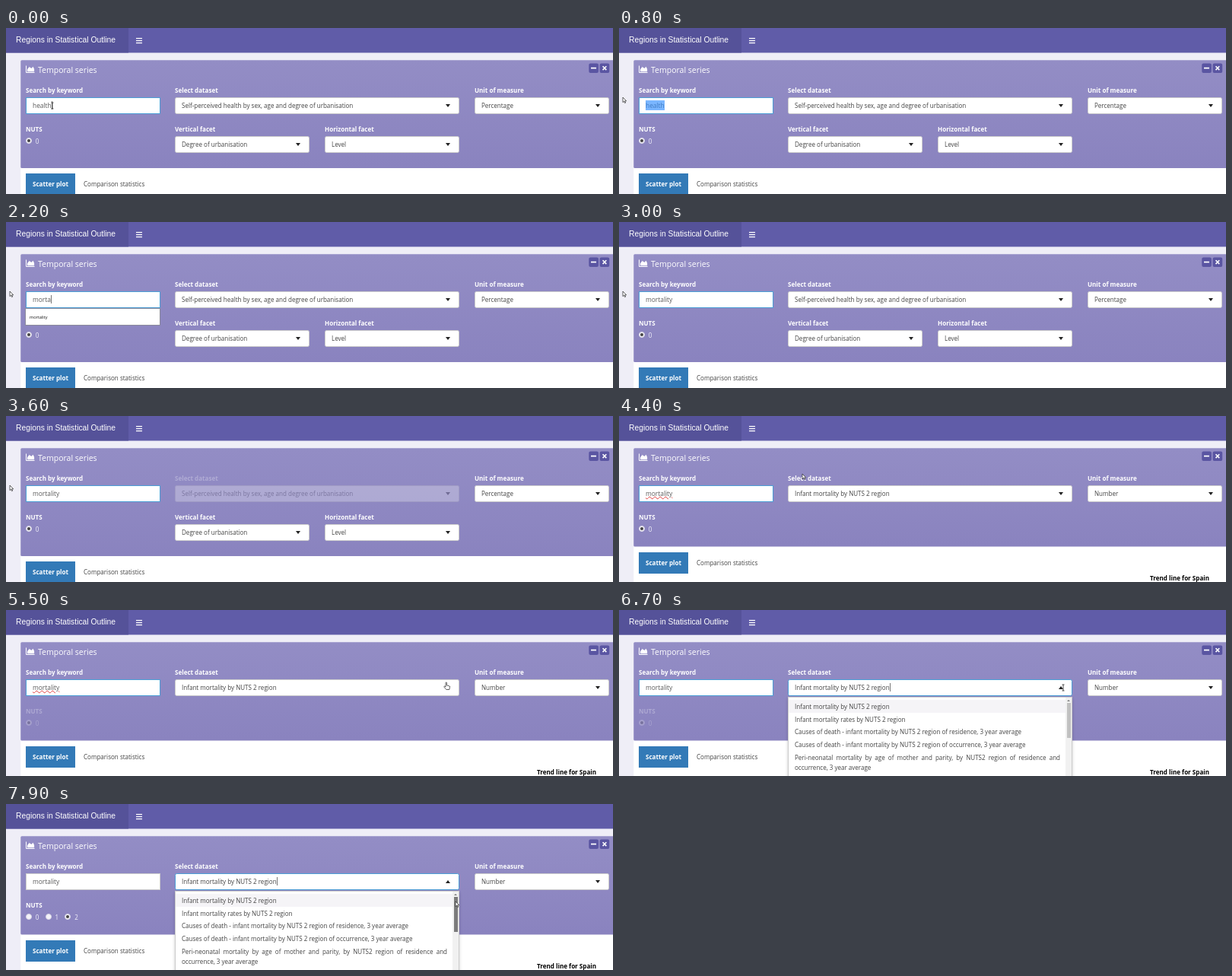
An HTML page for the animation above (8 s loop, 798 by 218 pixels).

```html
<!DOCTYPE html>
<html lang="en">
<head>
<meta charset="utf-8">
<style>
html, body { margin: 0; width: 100%; height: 100%; overflow: hidden; }
body { position: relative; background: #efeef7; font: 8.05px "Open Sans", "Noto Sans", sans-serif; color: #444; }
div, svg { position: absolute; box-sizing: border-box; white-space: nowrap; }
svg { left: 0; top: 0; width: 798px; height: 218px; overflow: visible; }
#brand { left: 13px; top: 0; color: #fff; font: 10.3px/32px "Liberation Sans", Arial, sans-serif; }
#tabs { left: 19.5px; width: 790px; height: 80px; }
#tab { left: 6.5px; top: 7px; width: 65px; height: 28px; background: #337ab7; color: #fff; font-weight: 700; line-height: 28px; text-align: center; }
#other { left: 82.5px; top: 7px; line-height: 28px; }
#trend { left: 678.5px; top: 30px; line-height: 22px; color: #000; font-weight: 700; }
.label { color: #fff; font-weight: 700; line-height: 12px; }
.field { height: 22px; padding-left: 8px; border: 1px solid #ccc; border-radius: 2.5px; background: #fff; line-height: 20px; }
.field.focus { border-color: #4c9fd6; }
#search { border-radius: 0; }
.arrow { right: 11px; top: 8px; border: 3.6px solid transparent; border-top: 4px solid #222; border-bottom: 0; }
.arrow.up { border-top: 0; border-bottom: 4px solid #222; }
.edit { display: inline-block; position: static; line-height: 11px; border-right: .8px solid transparent; }
.edit.caret { border-color: #777; }
#word { font-size: 8.4px; color: #5a5a5a; }
#word.wavy { text-decoration: underline wavy #e04040 .6px; text-underline-offset: 0; }
#mark { top: 95px; height: 13px; background: #3390ff; opacity: .65; }
#hint { left: 25px; top: 113px; width: 178px; height: 23px; padding-left: 5px; border: .7px solid #8a8a9a; background: #fff; color: #111; font-size: 5.6px; line-height: 22px; }
.radio { top: 144px; width: 8px; height: 8px; border: 1px solid #d8d6e4; border-radius: 50%; background: #f4f3fa; }
.radio.on::after { content: ""; position: absolute; left: 1px; top: 1px; width: 4px; height: 4px; border-radius: 50%; background: #444; }
.num { top: 142.5px; line-height: 12px; color: #f3f2fb; }
#list { left: 222px; top: 114px; width: 374px; height: 130px; padding-top: 3px; border: 1px solid #ccc; background: #fff; box-shadow: 0 2px 4px #0003; }
#list p { margin: 0; width: 365px; box-sizing: border-box; padding: 1.85px 8px; line-height: 13px; white-space: normal; text-align: justify; }
#list p:first-child { background: #f5f4f7; }
#rail { right: 0; top: 0; width: 8px; height: 130px; background: #f1f1f1; }
#rail::before { content: ""; position: absolute; left: 2px; top: 3px; border: 2px solid transparent; border-top: 0; border-bottom: 2.5px solid #777; }
#thumb { left: 2px; top: 7px; width: 5px; height: 46px; }
</style>
</head>
<body>
<svg>
  <linearGradient id="shade" x2="0" y2="1"><stop stop-color="#938dc5"/><stop offset="1" stop-color="#8a83bf"/></linearGradient>
  <rect width="798" height="32.5" fill="#605ca8"/>
  <rect width="161" height="32.5" fill="#555299"/>
  <rect x="19.25" y="44" width="790" height="180" fill="#fff"/>
  <rect id="panel" x="19.25" y="42.3" width="790" rx="1.5" fill="url(#shade)"/>
  <path d="M171 13.6h8M171 16.6h8M171 19.6h8" stroke="#fff" stroke-width="1.4"/>
  <path d="M26.5 49.5v9h11" fill="none" stroke="#fff"/>
  <path d="M28 57.3v-3l2.7-3.2 2.6 2 2.3-2.4 1.5 3.2v3.4z" fill="#fff"/>
  <g fill="#5a55a2"><rect x="766.3" y="46.5" width="12.6" height="12.5" rx="2"/><rect x="780.6" y="46.5" width="12.6" height="12.5" rx="2"/></g>
  <path d="M769 52.6h7M784.5 50.3l4.8 4.8m0-4.8l-4.8 4.8" stroke="#fff" stroke-width="1.6"/>
</svg>
<div id="brand">Regions in Statistical Outline</div>
<div class="label" style="left:42px;top:48.5px;font-weight:500;font-size:10.5px">Temporal series</div>

<div class="label" style="left:26px;top:75.5px">Search by keyword</div>
<div id="search" class="field" style="left:26px;top:91px;width:177px"><div id="word" class="edit"></div></div>
<div id="mark"></div>

<div id="dataset">
  <div class="label" style="left:222px;top:75.5px">Select dataset</div>
  <div id="pick" class="field" style="left:222px;top:91px;width:374px"><div id="choice" class="edit"></div><div id="pickArrow" class="arrow"></div></div>
</div>

<div class="label" style="left:616px;top:75.5px">Unit of measure</div>
<div class="field" style="left:616px;top:91px;width:177px"><span id="unit"></span><div class="arrow"></div></div>

<div id="facets">
  <div class="label" style="left:222px;top:126.5px">Vertical facet</div>
  <div class="field" style="left:222px;top:142px;width:177px">Degree of urbanisation<div class="arrow"></div></div>
  <div class="label" style="left:419px;top:126.5px">Horizontal facet</div>
  <div class="field" style="left:419px;top:142px;width:177px">Level<div class="arrow"></div></div>
</div>

<div id="nuts">
  <div class="label" style="left:26px;top:126.5px">NUTS</div>
  <div id="first" class="radio" style="left:26px"></div><div class="num" style="left:38.8px">0</div>
  <div id="more">
    <div class="radio" style="left:52px"></div><div class="num" style="left:64.5px">1</div>
    <div class="radio on" style="left:77px"></div><div class="num" style="left:90.2px">2</div>
  </div>
</div>
<div id="hint">mortality</div>

<div id="tabs">
  <div id="tab">Scatter plot</div>
  <div id="other">Comparison statistics</div>
  <div id="trend">Trend line for Spain</div>
</div>

<div id="list">
  <p>Infant mortality by NUTS 2 region</p>
  <p>Infant mortality rates by NUTS 2 region</p>
  <p>Causes of death - infant mortality by NUTS 2 region of residence, 3 year average</p>
  <p>Causes of death - infant mortality by NUTS 2 region of occurrence, 3 year average</p>
  <p>Peri-neonatal mortality by age of mother and parity, by NUTS2 region of residence and occurrence, 3 year average</p>
  <div id="rail"><div id="thumb"></div></div>
</div>

<svg>
  <g id="mouse">
    <path id="beam" d="M-1.5-4h3M0-4v8M-1.5 4h3" stroke="#222" stroke-width=".8"/>
    <path id="pointer" d="M0 0v6.6l1.6-1.4 1.1 2.4 1-.5-1.1-2.3h2.1z" fill="#fff" stroke="#222" stroke-width=".7"/>
    <path id="hand" d="M-1-4.2c0-1.2 1.5-1.2 1.5 0V-1l3 .7c.9.3 1.1 1 .9 1.9L3.8 4.5H-.2L-3 1.2c-.5-.9.4-1.5 1.1-.9l.9.8z" fill="#fff" stroke="#222" stroke-width=".7"/>
  </g>
</svg>

<script>
const ui = {};
document.querySelectorAll("[id]").forEach(el => ui[el.id] = el);
const clamp = v => Math.max(0, Math.min(1, v));
const show = (el, on) => el.style.display = on ? "" : "none";
const setText = (el, s) => { if (el.textContent !== s) el.textContent = s; };
const fade = (t, start, end) => t < end ? 1 - .72 * clamp((t - start) / 300) : 1;

const word = "mortality";
const strokes = [1500, 1700, 1900, 2100, 2200, 2300, 2400, 2500, 2600];
// time, x, y of the mouse
const path = [[0, 61, 102], [100, 61, 102], [800, 5, 91], [3600, 5, 91], [4400, 241, 76],
  [5200, 579, 100], [6400, 579, 100], [6600, 584, 102], [7300, 584, 102], [7800, 591, 128], [8000, 591, 128]];

function mouseAt(t) {
  const i = path.findIndex(p => p[0] > t), [a, b] = [path[i - 1], path[i]];
  const k = (t - a[0]) / (b[0] - a[0]);
  return [a[1] + (b[1] - a[1]) * k, a[2] + (b[2] - a[2]) * k];
}

function draw(t) {
  const [x, y] = mouseAt(t);
  const loaded = t >= 4100, open = t >= 6500, typing = t >= 1500 && t < 2700;

  setText(ui.word, t < 1500 ? "health" : word.slice(0, strokes.filter(s => s <= t).length));
  ui.word.className = "edit" + (t < 100 || typing ? " caret" : "") + (loaded && !open ? " wavy" : "");
  ui.search.classList.toggle("focus", t < 6900);
  show(ui.hint, t >= 1500 && t < 2800);

  const left = Math.max(34.5, x);
  show(ui.mark, t >= 100 && t < 1500);
  ui.mark.style.left = left + "px";
  ui.mark.style.width = Math.max(0, 59.5 - left) + "px";

  setText(ui.choice, t < 3800 ? "Self-perceived health by sex, age and degree of urbanisation" : "Infant mortality by NUTS 2 region");
  ui.choice.classList.toggle("caret", open);
  ui.pick.classList.toggle("focus", open);
  ui.pickArrow.classList.toggle("up", open);
  ui.dataset.style.opacity = fade(t, 3000, 3800);
  setText(ui.unit, loaded ? "Number" : "Percentage");

  show(ui.facets, !loaded);
  show(ui.trend, loaded);
  ui.panel.setAttribute("height", loaded ? 129.2 : 141.7);
  ui.tabs.style.top = (loaded ? 172 : 184) + "px";

  const levels = t >= 7100;
  ui.nuts.style.opacity = fade(t, 5000, 7100);
  show(ui.more, levels);
  ui.first.classList.toggle("on", !levels);

  show(ui.list, open);
  ui.thumb.style.background = t >= 7800 ? "#7c7c7c" : "#c1c1c1";

  const hand = t >= 5000 && t < 6500, beam = t < 700 || open && t < 7400;
  show(ui.hand, hand);
  show(ui.beam, beam);
  show(ui.pointer, !hand && !beam);
  ui.mouse.setAttribute("transform", `translate(${x} ${y})`);
}

function tick() {
  draw(Math.floor(performance.now() % 8000 / 100) * 100);
  requestAnimationFrame(tick);
}
tick();
</script>
</body>
</html>
```
